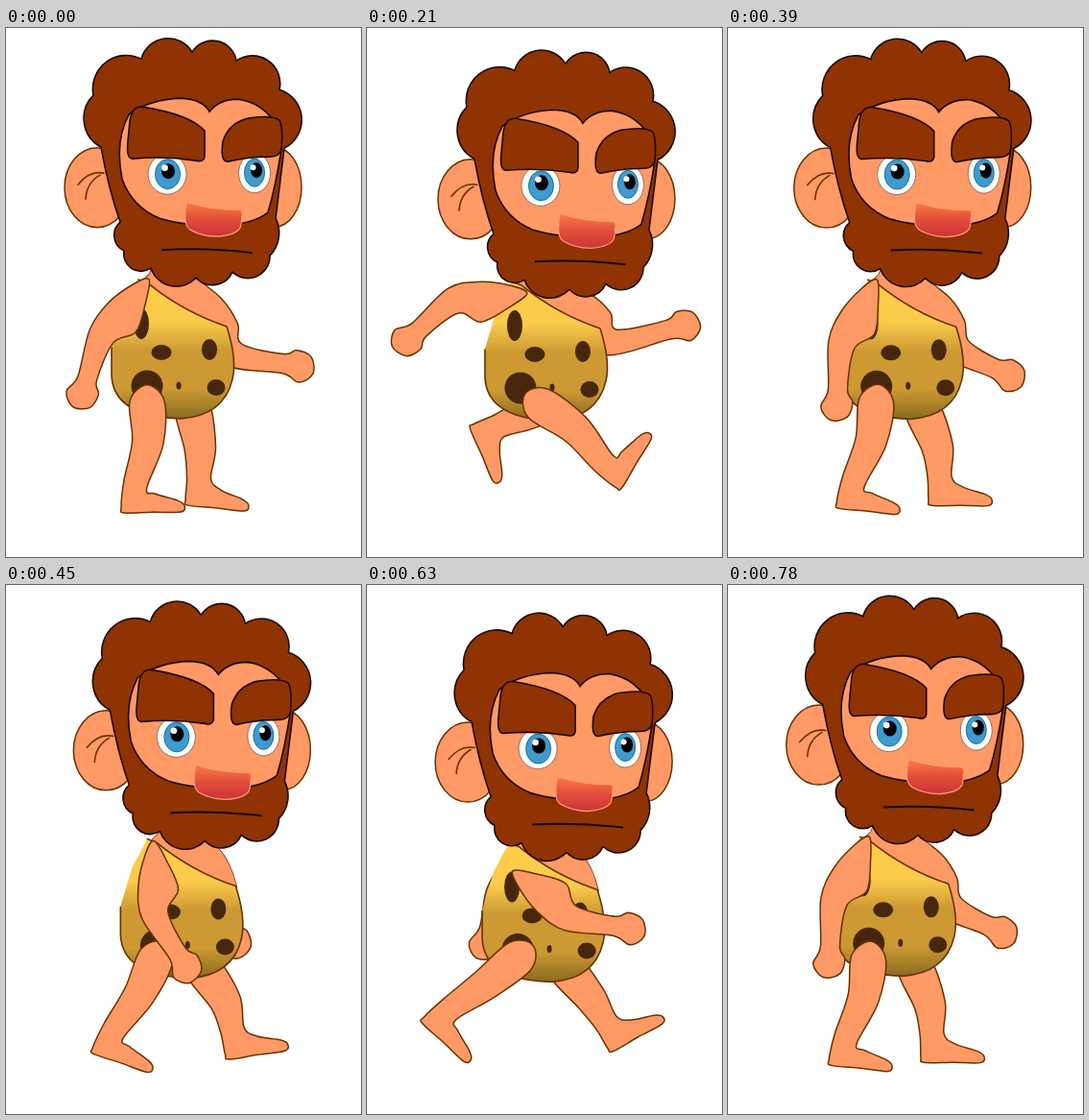
An HTML page for the animation above (0.81 s loop, 370 px wide and 551 px high).

```html
<!DOCTYPE html>
<html lang="en">
<head>
<meta charset="utf-8">
<title>Walking caveman</title>
<style>
html, body { margin: 0; width: 100%; height: 100%; overflow: hidden; background: #fff; }
svg { display: block; width: 100vw; height: 100vh; }
.skin { fill: #ff9966; stroke: #663300; stroke-width: 1.5; stroke-linejoin: round; }
.hair { fill: #8f3303; stroke: #1c0a00; stroke-width: 1.6; stroke-linejoin: round; }
.line { fill: none; stroke: #663300; stroke-width: 1.6; stroke-linecap: round; stroke-linejoin: round; }
.eye { fill: #fff; stroke: #7c5a50; stroke-width: .8; }
.iris { fill: #3d9bd0; stroke: #1f6c9c; stroke-width: 1; }
</style>
</head>
<body>
<svg viewBox="0 0 370 551">
  <defs>
    <linearGradient id="cloth" gradientUnits="userSpaceOnUse" x1="0" y1="262" x2="0" y2="408">
      <stop offset="0" stop-color="#ffcc47"/>
      <stop offset=".3" stop-color="#fbcb4c"/>
      <stop offset=".51" stop-color="#cc9933"/>
      <stop offset=".78" stop-color="#cc9933"/>
      <stop offset="1" stop-color="#87691f"/>
    </linearGradient>
    <linearGradient id="nose" x1="0" y1="0" x2="0" y2="1">
      <stop offset="0" stop-color="#fb7844"/>
      <stop offset=".5" stop-color="#e04d3b"/>
      <stop offset="1" stop-color="#cc3338"/>
    </linearGradient>
    <path id="chest" d="M154 240 L150 256 L142 264 L150 268 Q185 296 231 312 Q225 286 212 272 L198 260 L196 240 Z"/>
  </defs>

  <use class="body skin" href="#chest"/>
  <path id="farArm" class="skin"/>
  <path id="farLeg" class="skin"/>

  <g class="body">
    <use href="#chest" fill="#ff9966"/>
    <path fill="url(#cloth)" d="M138 262 L148 266 Q185 296 230 311 Q241 345 236 366 Q227 404 182 407 Q112 405 110 362 L110 332 L122 292 Z"/>
    <g fill="#47270b">
      <ellipse cx="141" cy="308" rx="8" ry="16"/>
      <ellipse cx="162" cy="338" rx="10.5" ry="8"/>
      <ellipse cx="212" cy="335" rx="8" ry="11"/>
      <ellipse cx="219" cy="374.5" rx="9.5" ry="8.5"/>
      <circle cx="147" cy="373" r="16.5"/>
      <ellipse cx="180" cy="372.5" rx="2.5" ry="4"/>
    </g>
    <path class="line" d="M138 262 L148 266 Q185 296 230 311 Q241 345 236 366 Q227 404 182 407 Q112 405 110 362 L110 333"/>
  </g>

  <path id="nearLeg" class="skin"/>
  <path id="nearArm" class="skin"/>

  <g id="head">
    <ellipse class="skin" cx="95" cy="166" rx="34" ry="41.5"/>
    <ellipse class="skin" cx="280" cy="165.500" rx="28" ry="41.5"/>
    <path class="line" d="M102 151 Q87 148 75 163 M98 153 Q84 161 83 178"/>
    <path class="hair" d="M99 124 A34 34 0 0 1 91 70 A35 35 0 0 1 141 32 A29 29 0 0 1 194 25
      A25 25 0 0 1 240 34 A29 29 0 0 1 285 64 A33 33 0 0 1 290 125 L281 198
      A34 34 0 0 1 275 237 A23 23 0 0 1 236 254 A23 23 0 0 1 198 260 A28 28 0 0 1 151 250
      A18 18 0 0 1 123 232 A18 18 0 0 1 119 202 Q107 168 99 124 Z"/>
    <path d="M128 90 Q150 74 182 73 Q205 74 212 87 Q222 74 242 74 Q271 78 286 108 L287 126 Q281 165 273 192
      Q258 204 225 206 Q186 206 160 198 Q131 186 121 157 Q113 118 128 90 Z"
      fill="#ff9966" stroke="#1c0a00" stroke-width="1.6"/>
    <ellipse class="eye" cx="168" cy="152" rx="20" ry="21"/>
    <ellipse class="iris" cx="168.5" cy="152" rx="13" ry="15.5"/>
    <ellipse cx="169" cy="149" rx="7" ry="8"/>
    <circle cx="165.5" cy="145.5" r="3.3" fill="#fff"/>
    <ellipse class="eye" cx="259" cy="151" rx="16.5" ry="20.5"/>
    <ellipse class="iris" cx="259" cy="150.5" rx="10.5" ry="14.5"/>
    <ellipse cx="261" cy="148" rx="6" ry="8"/>
    <circle cx="257.5" cy="145" r="3" fill="#fff"/>
    <path class="hair" d="M129 97 Q131 81 142 82 Q192 90 207 107 L207 134 Q206 140 198 138 Q165 133 132 136 Q125 136 127 118 Z"/>
    <path class="hair" d="M226 118 Q232 99 252 94 Q277 90 285 96 Q289 104 287 126 Q285 134 275 134 Q252 134 231 139 Q223 139 226 118 Z"/>
    <path fill="url(#nose)" d="M189 182 Q184 204 192 210 Q204 217 220 217 Q239 216 244 208 Q247 200 245 190 Q214 190 189 182 Z"/>
    <path d="M187 192 Q185 205 192 210 Q204 217 220 217 Q239 216 244 208 Q246 203 245.5 196" fill="none" stroke="#ff9a80" stroke-width="1.2"/>
    <path d="M163 231 Q210 228.5 256 234" fill="none" stroke="#120500" stroke-width="2" stroke-linecap="round"/>
  </g>
</svg>
<script>
const LOOP = 810, STEP = 30, PEAK = 585;
const { sin, cos, PI } = Math;
const rad = deg => deg * PI / 180;
const el = id => document.getElementById(id);
const bodies = document.querySelectorAll('.body');

// Point at distance "along" an angle and "out" to its front side.
function at([x, y], deg, along, out = 0) {
  const c = cos(rad(deg)), s = sin(rad(deg));
  return [x + c * along + s * out, y + s * along - c * out];
}

// Closed curve through all points.
function smooth(pts) {
  const n = pts.length, get = i => pts[(i + n) % n];
  const fmt = p => p[0].toFixed(2) + ' ' + p[1].toFixed(2);
  const ctrl = (p, a, b) => [p[0] + (b[0] - a[0]) / 6, p[1] + (b[1] - a[1]) / 6];
  let d = 'M' + fmt(pts[0]);
  for (let i = 0; i < n; i++) {
    const p = get(i), q = get(i + 1);
    d += 'C' + [ctrl(p, get(i - 1), q), ctrl(q, get(i + 2), p), q].map(fmt).join(' ');
  }
  return d + 'Z';
}

function leg({ hip, thigh, shin, foot, upper, lower }) {
  const knee = at(hip, thigh, upper), ankle = at(knee, shin, lower);
  const mid = (thigh + shin) / 2;
  const f = (x, y) => at(ankle, foot, x, -y);
  return smooth([
    at(hip, thigh, -17), at(hip, thigh, 0, 18), at(knee, mid, 0, 16.5),
    at(ankle, shin, -9, 12), f(23, 1), f(46, 8.5), f(53, 14), f(49, 20.5),
    f(20, 20), f(-10, 20), f(-13, 14), at(ankle, shin, -10, -13),
    at(knee, mid, 0, -16), at(hip, thigh, 0, -18)
  ]);
}

function arm({ top, swing, fore, upper, lower, bulge }) {
  const elbow = at(top, swing, upper), hand = at(elbow, fore, lower);
  const mid = (swing + fore) / 2, k = upper / 77;
  return smooth([
    top, at(top, swing, 22 * k, 13), at(top, swing, 51 * k, bulge), at(elbow, mid, 0, 13),
    at(hand, fore, -17, 9.5), at(hand, fore, -4, 16), at(hand, fore, 12, 12),
    at(hand, fore, 17, -5), at(hand, fore, 4, -16.5), at(hand, fore, -15, -10.5),
    at(elbow, mid, 0, -15), at(top, swing, 46 * k, -17.5), at(top, swing, 14 * k, -9.5)
  ]);
}

function draw(t) {
  const phase = 2 * PI * (t - PEAK) / LOOP;
  const bob = cos(2 * phase);
  // s runs from -1 (near leg forward) to 1 (near leg back); every joint follows it
  const s = cos(phase), s2 = s * s, s3 = s2 * s, s4 = s2 * s2, s5 = s4 * s;

  const x = 8.1 + 4.4 * bob - 4 * sin(phase);
  const y = 2.4 + 2.2 * bob + 2.5 * s;
  const headY = 8.6 + 8.3 * bob + 3.8 * s;
  el('head').setAttribute('transform', `translate(${x} ${headY})`);
  bodies.forEach(b => b.setAttribute('transform', `translate(${x} ${y})`));

  const parts = {
    nearLeg: leg({
      hip: [x + 147 + 12 * s4 - 9 * s5, y + 388 - 5 * s - 4 * s2],
      thigh: 96 + 36 * s - 7 * s2 + 21 * s3,
      shin: 111 + 28 * s - 14 * s2 + 23 * s3,
      foot: 4 + 28 * s - 12 * s2 + 27 * s3,
      upper: 43 + 5 * s2,
      lower: 55
    }),
    farLeg: leg({
      hip: [x + 194, y + 395 + 4 * s - 11 * s2],
      thigh: 71 - 44 * s + 33 * s2 - 10 * s3,
      shin: 86 - 25 * s + 20 * s2 - 29 * s3,
      foot: 1 - 21 * s + 17 * s2 - 31 * s3,
      upper: 45,
      lower: 40
    }),
    nearArm: arm({
      top: [x + 148 - 6 * s, y + 262 + 26 * s4 + 12 * s5],
      swing: 121 - 50 * s - 18 * s2 - 23 * s3,
      fore: 99 - 63 * s - 27 * s2 - 6 * s3,
      upper: 77,
      lower: 62,
      bulge: 24
    }),
    farArm: arm({
      top: [x + 203 - 29 * s4 - 22 * s5, y + 267],
      swing: 65 + 7 * s + 27 * s2 + 36 * s3,
      fore: 23 + 75 * s + 27 * s2 - 13 * s3,
      upper: 76 - 27 * s - 7 * s2 + 23 * s3,
      lower: 60 - 44 * s + 4 * s2 + 34 * s3,
      bulge: 17
    })
  };
  for (const id in parts) el(id).setAttribute('d', parts[id]);
}

let start = null;
function tick(now) {
  if (start === null) start = now;
  draw(Math.floor(Math.max(0, now - start) % LOOP / STEP) * STEP);
  requestAnimationFrame(tick);
}
draw(0);
requestAnimationFrame(tick);
</script>
</body>
</html>
```
